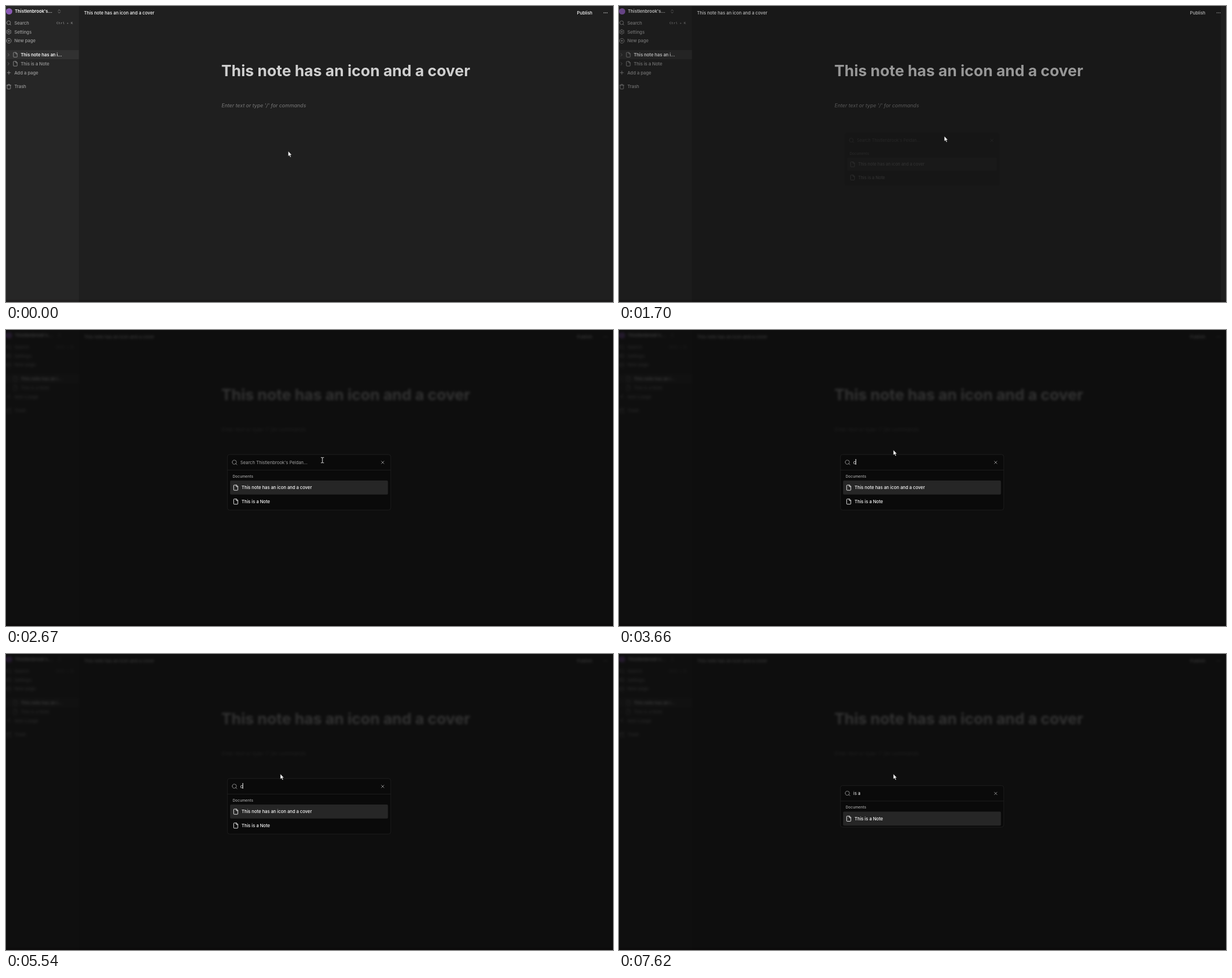
An HTML page for the animation above (8000 ms loop, 1070 px wide and 523 px high).

```html
<!DOCTYPE html>
<html lang="en">
<head>
<meta charset="utf-8">
<title>Note search</title>
<style>
  html, body { margin: 0; width: 100%; height: 100%; overflow: hidden; background: #1f1f1f; }
  #stage { position: relative; width: 1070px; height: 523px; overflow: hidden; }
  svg, #shade { position: absolute; left: 0; top: 0; }
  #shade { width: 1070px; height: 523px; background: rgba(10, 10, 10, .8); }
  text { font: 500 7.75px Inter, "Liberation Sans", sans-serif; font-optical-sizing: none; white-space: pre; }
  .icon { fill: none; stroke-width: 2; stroke-linecap: round; stroke-linejoin: round; }
  .title { font-size: 27.07px; font-weight: 700; }
  .hint { font-size: 9px; font-weight: 400; font-style: italic; }
  .keys { font: 400 6px "Liberation Mono", "Noto Sans Mono", monospace; }
  .strong { font-weight: 600; }
  .label { font-size: 6.65px; }
  .input { font-weight: 400; }
</style>
</head>
<body>
<div id="stage">
  <svg id="page" width="1070" height="523"></svg>
  <div id="shade"></div>
  <svg id="top" width="1070" height="523"></svg>
</div>
<script>
const LOOP = 8000;
const MUTED = '#9b9b9b', WHITE = '#fafafa';
const NOTES = ['This note has an icon and a cover', 'This is a Note'];
const $ = id => document.getElementById(id);

// Hexagonal cog outline, built from alternating radii
const cog = Array.from({ length: 24 }, (_, i) => {
  const r = i % 4 < 2 ? 10 : 7.8, a = (i - 0.5) * Math.PI / 12;
  return `${(12 + r * Math.sin(a)).toFixed(2)} ${(12 - r * Math.cos(a)).toFixed(2)}`;
}).join('L');
const ring = (x, y, r) => `M${x - r} ${y}a${r} ${r} 0 1 0 ${2 * r} 0a${r} ${r} 0 1 0 ${-2 * r} 0`;

const ICONS = {
  search: ring(11, 11, 8) + 'M21 21l-4.3-4.3',
  settings: `M${cog}Z` + ring(12, 12, 3),
  add: ring(12, 12, 10) + 'M8 12h8M12 8v8',
  plus: 'M5 12h14M12 5v14',
  file: 'M14.5 2H6a2 2 0 0 0-2 2v16a2 2 0 0 0 2 2h12a2 2 0 0 0 2-2V7.5zM14 2v6h6',
  trash: 'M3 6h18M19 6v14a2 2 0 0 1-2 2H7a2 2 0 0 1-2-2V6M8 6V4a2 2 0 0 1 2-2h4a2 2 0 0 1 2 2v2',
  right: 'M9 18l6-6-6-6',
  updown: 'M7 15l5 5 5-5M7 9l5-5 5 5',
  close: 'M18 6L6 18M6 6l12 12',
  dots: ring(5, 12, 1) + ring(12, 12, 1) + ring(19, 12, 1)
};

const icon = (name, cx, cy, size, color) =>
  `<path class="icon" d="${ICONS[name]}" stroke="${color}" transform="translate(${cx - size / 2} ${cy - size / 2}) scale(${size / 24})"/>`;
const text = (x, y, str, color, cls = '') =>
  `<text x="${x}" y="${y}" fill="${color}" class="${cls}">${str}</text>`;
const rect = (x, y, w, h, color, extra = '') =>
  `<rect x="${x}" y="${y}" width="${w}" height="${h}" fill="${color}" ${extra}/>`;

const action = (name, label, y) => icon(name, 5, y, 10, MUTED) + text(14.7, y + 2.8, label, MUTED);
const noteRow = (label, y, color, cls) =>
  icon('right', 4.5, y, 8.5, '#858585') + icon('file', 16.4, y, 10, MUTED) + text(26, y + 2.8, label, color, cls);

$('page').innerHTML =
  rect(0, 0, 1070, 523, '#1f1f1f') +
  rect(0, 0, 128.5, 523, '#262626') +
  rect(0, 78, 128.5, 16, '#313131') +
  '<circle cx="5.5" cy="9.5" r="5.6" fill="#8a5ab4"/>' +
  text(15.5, 12.3, 'Thistlenbrook\'s...', WHITE, 'strong') +
  icon('updown', 93.8, 9.5, 8.9, MUTED) +
  action('search', 'Search', 30) +
  text(89, 32, 'Ctrl + K', MUTED, 'keys') +
  action('settings', 'Settings', 45.7) +
  action('add', 'New page', 61.5) +
  noteRow('This note has an i...', 86.2, WHITE, 'strong') +
  noteRow(NOTES[1], 102, MUTED) +
  action('plus', 'Add a page', 117.8) +
  action('trash', 'Trash', 142.5) +
  text(137.5, 14.8, NOTES[0], WHITE) +
  text(1006.6, 14.8, 'Publish', WHITE) +
  icon('dots', 1057, 12, 9.5, '#d0d0d0') +
  text(379.5, 124, NOTES[0], '#cfcfcf', 'title') +
  text(380, 179.4, "Enter text or type '/' for commands", '#797979', 'hint');

$('top').innerHTML =
  '<g id="dialog">' +
    rect(390.3, 220, 287.9, 98.2, '#0a0a0a', 'id="frame" rx="4" stroke="#262626" stroke-width=".7"') +
    icon('search', 403, 234, 11, '#929292') +
    text(413, 236.8, '', WHITE, 'input') +
    rect(413, 228, 1, 10, WHITE, 'id="caret"') +
    icon('close', 664, 234, 9, '#b8b8b8') +
    rect(390.3, 247.2, 287.9, .6, '#2b2b2b') +
    text(399.5, 260.7, 'Documents', '#a3a3a3', 'label') +
    rect(395, 266, 278.3, 24.8, '#262626', 'rx="2"') +
    icon('file', 405, 278.6, 11, WHITE) +
    `<g id="first">${text(415.2, 281.4, '', WHITE)}</g>` +
    `<g id="second">${icon('file', 405, 303.2, 11, WHITE)}${text(415.2, 306, NOTES[1], WHITE)}</g>` +
  '</g>' +
  rect(0, 519, 1070, 4, 'rgba(10,0,4,.15)') +
  '<path id="arrow" d="M0 0V9.1L2.1 7.2 3.6 10.6 5.1 9.9 3.6 6.7H6.4Z" fill="#fff" stroke="#111" stroke-width=".5"/>' +
  '<path id="beam" d="M-2.6-4.7H-.8L0-4.1.8-4.7H2.6M0-4.1V4.1M-2.6 4.7H-.8L0 4.1.8 4.7H2.6" fill="none" stroke="#e8e8e8" stroke-width="1"/>';

const field = document.querySelector('.input');
const firstText = document.querySelector('#first text');

// Each table row starts with its time in ms; a value holds until the next row
const pointer = [
  [0, 497.4, 256.6, 'arrow'], [880, 540, 242, 'arrow'], [950, 573.4, 230, 'arrow'],
  [1830, 575, 232, 'beam'], [2670, 557.8, 230, 'beam'], [2730, 536, 226, 'beam'],
  [2790, 510, 222, 'beam'], [2850, 491, 214.5, 'arrow'], [2920, 483.6, 212, 'arrow']
];
// shade opacity, blur, dialog opacity, scale, drop, shade width
const opening = [
  [0, 0, 0, 0, .95, 0, 1061], [1700, .35, .2, .1, .948, 1.7, 1061],
  [1770, .8, 1.4, .7, .985, .5, 1070], [1830, 1, 2, 1, 1, 0, 1070]
];
const typing = [
  [0, ''], [3660, 'c'], [3790, 'co'], [4020, 'cov'], [4120, 'cove'], [4210, 'cover'],
  [4970, 'cove'], [5480, 'cov'], [5540, 'c'], [5600, ''],
  [6430, 'i'], [6610, 'is'], [6740, 'is '], [7060, 'is a']
];
const blink = [
  [0, 0], [1770, 1], [2180, 0], [2730, 1], [3280, 0], [3660, 1], [4770, 0],
  [5280, 1], [5790, 0], [6370, 1], [7620, 0]
];
const at = (table, t) => table.findLast(row => row[0] <= t).slice(1);

function render(t) {
  const [shade, blur, alpha, scale, drop, width] = at(opening, t);
  const [query] = at(typing, t);
  const [caretOn] = at(blink, t);
  const [x, y, shape] = at(pointer, t);

  $('shade').style.opacity = shade;
  $('shade').style.backdropFilter = `blur(${blur}px)`;
  $('shade').style.width = width + 'px';

  const single = query.startsWith('co') || query.startsWith('is ');
  const shift = drop + (single ? 12.4 : 0);
  $('dialog').setAttribute('opacity', alpha);
  $('dialog').setAttribute('transform', `translate(534.2 ${269 + shift}) scale(${scale}) translate(-534.2 -269)`);
  $('frame').setAttribute('height', single ? 73.5 : 98.2);
  $('second').style.display = single ? 'none' : '';
  firstText.textContent = NOTES[query.startsWith('is ') ? 1 : 0];

  field.textContent = query || "Search Thistlenbrook's Peldan...";
  field.setAttribute('fill', query ? WHITE : '#a3a3a3');
  const end = query ? field.getComputedTextLength() : 0;
  $('caret').setAttribute('x', Math.floor(413 + end));
  $('caret').style.display = caretOn ? '' : 'none';

  for (const id of ['arrow', 'beam']) $(id).style.display = id === shape ? '' : 'none';
  $(shape).setAttribute('transform', `translate(${x} ${y})`);
}

const start = performance.now();
function tick() {
  render((performance.now() - start) % LOOP);
  requestAnimationFrame(tick);
}
tick();
</script>
</body>
</html>
```
